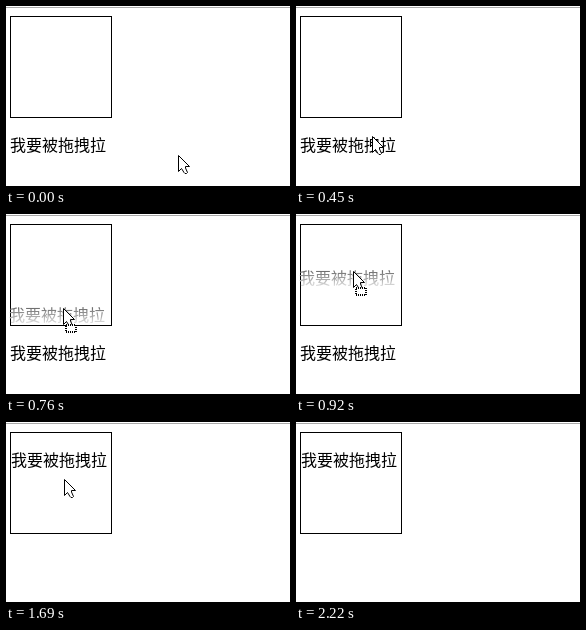
Recreate the animation shown at these times as an HTML page. Size 284 by 180 pixels, loop 2530 ms.

```html
<!DOCTYPE html>
<html lang="zh-CN">
<head>
<meta charset="utf-8">
<title>拖拽</title>
<style>
  html, body { margin: 0; width: 100%; height: 100%; overflow: hidden; background: #fff; }
  svg { display: block; width: 284px; height: 180px; }
  text { font: 16px "Noto Sans CJK SC", "Noto Sans CJK", sans-serif; }
</style>
</head>
<body>
<svg viewBox="0 0 284 180">
  <defs>
    <linearGradient id="fade" gradientUnits="userSpaceOnUse" x1="0" y1="132" x2="0" y2="147">
      <stop stop-color="#6c6c6c"/>
      <stop offset="1" stop-color="#ddd"/>
    </linearGradient>
  </defs>
  <path d="M0 1.5H284" stroke="#a9a9a9"/>
  <rect x="4.5" y="10.5" width="101" height="101" fill="none" stroke="#000"/>
  <text id="label" x="4" y="145">我要被拖拽拉</text>
  <text id="ghost" x="4" y="145" fill="url(#fade)">我要被拖拽拉</text>
  <g id="cursor" fill="#fff" stroke="#000">
    <path d="M.5 .5V16.5L3.5 13.5L6 17.5L7 18.5H8.5L9.5 17.5L7.5 13V11.5H11.5Z" stroke-linejoin="round"/>
    <rect id="badge" x="3" y="17" width="10" height="7" stroke-width="2" stroke-dasharray="1"/>
  </g>
</svg>
<script>
const LOOP = 2530, GRAB = 690, DROP = 1300, LEAVE = 2220;
const STEP = LOOP / 33, LEAD = 10; // the screen refreshes in even steps

// pointer path: step, x, y
const path = [
  [0, 172, 149],
  [4, 106, 133],
  [7, 61, 129],
  [8, 58, 132],
  [12, 57, 57],
  [22, 58, 57],
  [28, 252, 166],
];
const [, grabX, grabY] = path[3];

const $ = id => document.getElementById(id);
const show = (el, on) => { el.style.display = on ? "" : "none"; };
const move = (el, x, y) => el.setAttribute("transform", `translate(${x} ${y})`);

function pointer(step) {
  const next = path.findIndex(p => p[0] > step);
  if (next < 0) return path.at(-1).slice(1);
  const [s0, x0, y0] = path[next - 1], [s1, x1, y1] = path[next];
  const u = (step - s0) / (s1 - s0);
  return [Math.floor(x0 + (x1 - x0) * u), Math.floor(y0 + (y1 - y0) * u)];
}

function draw(time) {
  const [x, y] = pointer(Math.floor((time + LEAD) / STEP));
  const dropped = time >= DROP;
  const dragging = time >= GRAB && !dropped;

  move($("cursor"), x, y);
  show($("cursor"), time < LEAVE);
  show($("badge"), dragging);
  move($("ghost"), x - grabX, y - grabY);
  show($("ghost"), dragging);
  move($("label"), dropped ? 1 : 0, dropped ? -101 : 0);
}

const start = performance.now();
function frame() {
  draw((performance.now() - start) % LOOP);
  requestAnimationFrame(frame);
}
frame();
</script>
</body>
</html>
```
